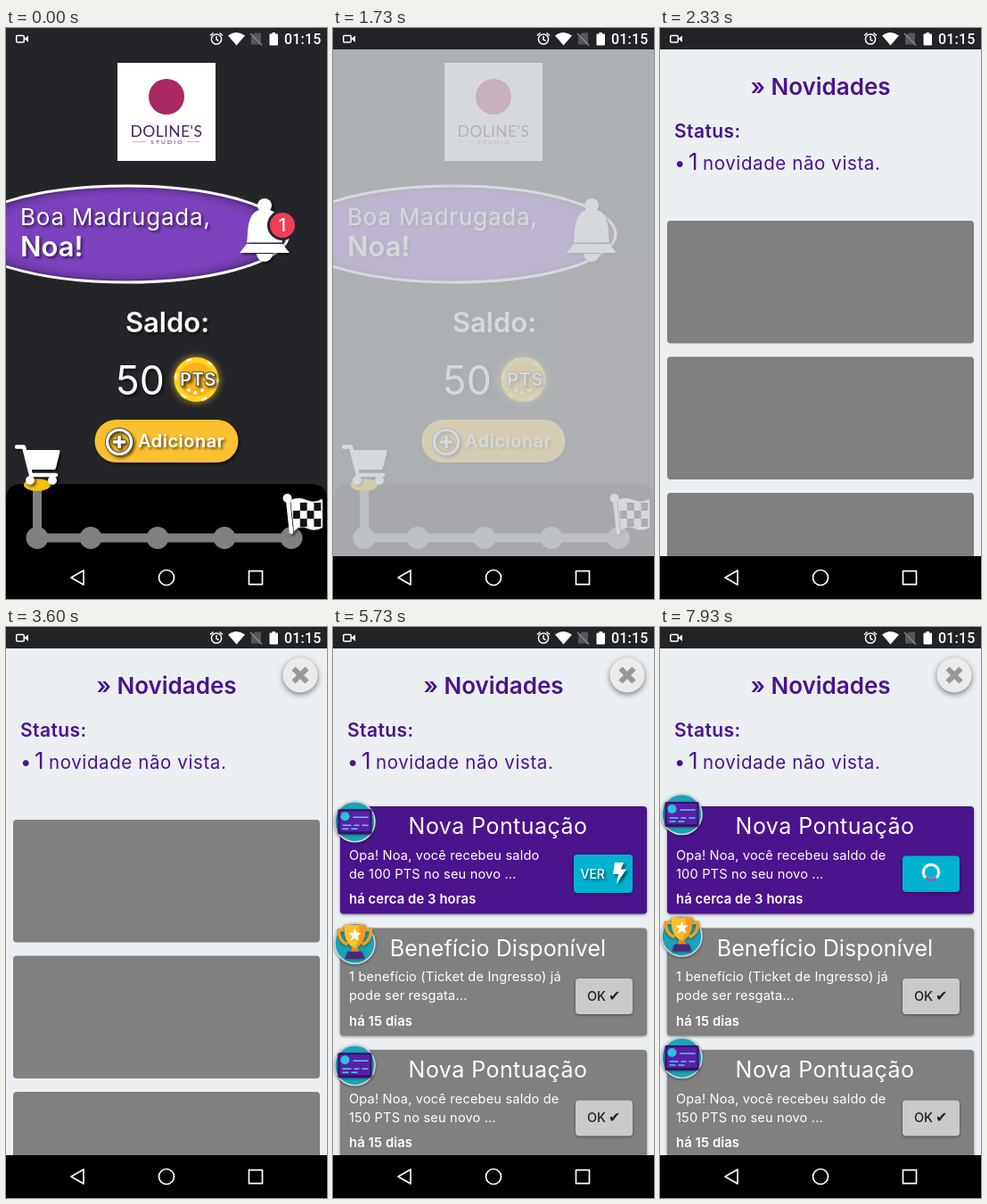
Write an HTML page that moves like this. It is 360 px wide and 640 px high and loops after 8000 ms.

```html
<!DOCTYPE html>
<html lang="pt-BR">
<head>
<meta charset="utf-8">
<title>Novidades</title>
<style>
  html, body { margin: 0; width: 100%; height: 100%; overflow: hidden; background: #000; }
  svg { display: block; width: 100%; height: 100%; font-family: Inter, "Open Sans", sans-serif; }
  text { white-space: pre; }
  .bold { font-weight: 600; }
  .shade { filter: drop-shadow(2px 2px 1.5px rgba(0, 0, 0, .6)); }
  .lift { filter: drop-shadow(0 1.5px 1.5px rgba(0, 0, 0, .45)); }
</style>
</head>
<body>
<svg viewBox="0 0 360 640" fill="#fff">
  <defs>
    <radialGradient id="violet">
      <stop offset=".8" stop-color="#7c41bd"/>
      <stop offset=".92" stop-color="#6c39a5"/>
      <stop offset="1" stop-color="#452370"/>
    </radialGradient>
    <clipPath id="page-area"><path d="M0 24H360V592H0Z"/></clipPath>
    <g id="ticket">
      <rect x="-19" y="-14" width="38" height="28" rx="2" fill="#35106b"/>
      <rect x="-17" y="-12" width="34" height="23" rx="1" fill="#5a1fa8"/>
      <circle cx="-11" cy="-6" r="5" fill="#26c6da"/>
      <path d="M-2 -5H15M-14 4H-4M-1 4H5M8 4H15M-14 8H-7M-4 8H3" stroke="#4dd0e1" stroke-width="1.6"/>
    </g>
    <g id="trophy">
      <path d="M-12 -15H-18Q-18 -2 -8 1M12 -15H18Q18 -2 8 1" fill="none" stroke="#f0a020" stroke-width="3.5"/>
      <path d="M-3 2H3L5 11H-5Z" fill="#e08a1e"/>
      <path d="M-12 -21H12Q13 1 0 5Q-13 1 -12 -21Z" fill="#fbc02d"/>
      <path d="M4 -21H12Q13 1 0 5Q6 -4 4 -21Z" fill="#f39c1f"/>
      <path d="M0 -17L2 -12 7 -12 3 -8 5 -3 0 -6 -5 -3 -3 -8 -7 -12 -2 -12Z"/>
      <path d="M-8 9H8L11 17H-11Z" fill="#4b2a7c"/>
    </g>
  </defs>

  <rect width="360" height="640" fill="#232529"/>

  <g id="home">
    <rect x="125" y="39" width="110" height="110"/>
    <circle cx="180" cy="77" r="20" fill="#a8285f"/>
    <g fill="#4a2560" text-anchor="middle" font-family="Lato, sans-serif">
      <text x="180" y="122" font-size="17.5" letter-spacing=".4">DOLINE'S</text>
      <text x="181" y="130" font-size="6.5" letter-spacing="2.2">STUDIO</text>
      <path d="M142 127.5H157M203 127.5H218" stroke="#b79fc0" stroke-width=".8"/>
    </g>

    <ellipse cx="135" cy="231" rx="182" ry="54" fill="url(#violet)" stroke="#fff" stroke-width="3"/>
    <g class="shade">
      <text x="16" y="221" font-size="26" letter-spacing=".8">Boa Madrugada,</text>
      <text x="16" y="256" font-size="31" class="bold">Noa!</text>
    </g>

    <g id="bell" class="shade">
      <circle cx="290" cy="199" r="8"/>
      <path d="M270 240.500C272 231 268 203 290 203S308 231 310 240.500Z"/>
      <path d="M270 242H310L318 252H262Z"/>
      <path d="M281 253a9 9 0 0 0 18 0Z"/>
    </g>
    <g id="badge">
      <circle cx="310" cy="221" r="15.500" fill="#ef3f53" stroke="#2a2238" stroke-width="3"/>
      <text x="310" y="228" font-size="20" font-weight="500" text-anchor="middle">1</text>
    </g>

    <g class="shade">
      <text x="181" y="341" font-size="31" class="bold" text-anchor="middle">Saldo:</text>
      <text x="150.500" y="411" font-size="44.500" text-anchor="middle">50</text>
    </g>
    <g style="filter:drop-shadow(0 0 4px #c9a02e)">
      <circle cx="213.500" cy="394" r="25" fill="#ffd426"/>
      <circle cx="213.500" cy="394" r="23.500" fill="none" stroke="#fff0b0" stroke-width="3" stroke-dasharray="6 18.600"/>
      <circle cx="213.500" cy="394" r="19" fill="#fbb31a"/>
      <path d="M205 406h.1M212 409h.1M220 406h.1" stroke="#fff" stroke-width="4" stroke-linecap="round"/>
    </g>
    <text x="215.500" y="401" font-size="20" class="bold shade" letter-spacing=".7" text-anchor="middle"
      stroke="#51412b" stroke-width="1.600" paint-order="stroke">PTS</text>

    <rect x="99.500" y="439" width="161" height="48" rx="24" fill="#fac02f" class="shade"/>
    <g class="shade">
      <circle cx="127" cy="464" r="13.500" fill="none" stroke="#54472a" stroke-width="5"/>
      <circle cx="127" cy="464" r="13.500" fill="none" stroke="#fff" stroke-width="3.200"/>
      <path d="M119.500 464h15M127 456.500v15" stroke="#54472a" stroke-width="5.500"/>
      <path d="M120 464h14M127 457v14" stroke="#fff" stroke-width="3.600"/>
      <text x="148" y="470" font-size="20" class="bold" letter-spacing=".5">Adicionar</text>
    </g>

    <path d="M0 640V529Q0 511 18 511H342Q360 511 360 529V640Z" fill="#000"/>
    <g id="track" fill="#808080">
      <path d="M35 514V571.500H320" fill="none" stroke="#808080" stroke-width="10"/>
    </g>
    <ellipse cx="35" cy="512" rx="15" ry="7" fill="#f4c20d"/>
    <g class="shade">
      <path d="M12 469.500H20L28 501H56" fill="none" stroke="#fff" stroke-width="4.500" stroke-linecap="round" stroke-linejoin="round"/>
      <path d="M22 473H59Q61 473 60.500 475L56 493Q55.500 495 54 495H27Z"/>
      <circle cx="27" cy="507" r="5"/><circle cx="52" cy="507" r="5"/>
    </g>
    <g id="flag" class="shade">
      <path d="M316 528L320 565" stroke="#fff" stroke-width="4.500" stroke-linecap="round"/>
      <circle cx="315.500" cy="527" r="5"/>
      <path d="M319 529Q328 525 337 529T354 528Q355 528 355 530V560Q346 565 338 561T323 564Z"/>
    </g>
  </g>

  <rect id="dim" width="360" height="640" fill="#000"/>
  <g id="page" clip-path="url(#page-area)">
    <rect y="24" width="360" height="568" fill="#ebeff2"/>
    <g id="news" fill="#4a148c">
      <text x="180" y="75" font-size="26" class="bold" text-anchor="middle">» Novidades</text>
      <text x="16" y="123" font-size="21" class="bold" letter-spacing=".4">Status:</text>
      <text x="16" y="159" font-size="22">•</text>
      <text x="32" y="159" font-size="26">1</text>
      <text x="48" y="159" font-size="20.500" letter-spacing=".6">novidade não vista.</text>
    </g>
    <g id="placeholders" fill="#808080">
      <rect x="8" y="216" width="344" height="137.500" rx="4"/>
      <rect x="8" y="368.500" width="344" height="137.500" rx="4"/>
      <rect x="8" y="521" width="344" height="137.500" rx="4"/>
    </g>
    <g id="cards"></g>
    <g id="icons"></g>
    <g id="close">
      <circle cx="330" cy="54" r="19.500" fill="#ebebec" style="filter:drop-shadow(0 2px 3px rgba(0,0,0,.5))"/>
      <path d="M322.500 46.500l15 15M337.500 46.500l-15 15" stroke="#989898" stroke-width="6"/>
    </g>
  </g>

  <rect id="status-shade" width="360" height="24" fill="#212327"/>
  <g id="status">
    <rect x="11.700" y="8.500" width="8.500" height="7.500" rx="1" fill="none" stroke="#fff" stroke-width="1.500"/>
    <path d="M20.500 12L25 8.500V16Z"/>
    <g fill="none" stroke="#fff" stroke-width="1.500">
      <circle cx="236" cy="12.500" r="5.600"/>
      <path d="M236 9V13L238.500 14.500M229 8.500L232.500 5.500M243 8.500L239.500 5.500"/>
    </g>
    <path d="M249 8.500Q258.500 1.500 268 8.500L258.500 19.500Z"/>
    <path d="M279 5.500H286V18.500H275V9.500Z" fill="#55565b"/>
    <path d="M274 6L287 19.500" stroke="#85868a" stroke-width="1.500"/>
    <path d="M298.500 5H302V6.500H304Q305 6.500 305 7.500V18.500Q305 19.500 304 19.500H296.500Q295.500 19.500 295.500 18.500V7.500Q295.500 6.500 296.500 6.500H298.500Z"/>
    <text x="312" y="18" font-size="16" font-weight="500" letter-spacing=".2" font-family="Roboto, sans-serif">01:15</text>
  </g>
  <rect id="nav-shade" y="592" width="360" height="48" fill="#000"/>
  <g fill="none" stroke="#fff" stroke-width="1.700" stroke-linejoin="round">
    <path d="M73 616L87 608V624Z"/>
    <circle cx="180" cy="616" r="8.500"/>
    <rect x="272.500" y="608.700" width="15" height="15"/>
  </g>
</svg>

<script>
const LOOP = 8000;
const FADE = 1665, LISTED = 2330, CLOSE_IN = 2830, LOADED = 4400, ICONS_IN = 5480, TAPPED = 7070;

const byId = id => document.getElementById(id);
const show = (id, visible) => byId(id).setAttribute("display", visible ? "inline" : "none");
const set = (id, name, value) => byId(id).setAttribute(name, value);
const progress = (t, start, length) => Math.min(1, Math.max(0, (t - start) / length));

const okButton = y => `
  <rect x="272" y="${y + 56.5}" width="64" height="40" rx="4" fill="#c8cacb" class="lift"/>
  <g fill="#222"><text x="285" y="${y + 81}" font-size="14.5" font-weight="500">OK</text>
  <text x="309" y="${y + 81}" font-size="16" font-family="DejaVu Sans, sans-serif">✔</text></g>`;

const seeButton = `
  <g id="see">
    <rect x="270" y="255" width="66" height="43" rx="4" fill="#00b2cf" class="lift"/>
    <g class="shade"><text x="277.5" y="282" font-size="14" font-weight="500">VER</text>
    <path d="M316 264H326L323 271.5H329L318 288L320 277H314Z"/></g>
  </g>
  <g id="loading">
    <rect x="272" y="256.5" width="64" height="40.500" rx="4" fill="#00b2cf" class="lift"/>
    <g id="spinner" fill="none" stroke-width="3.200">
      <circle cx="304" cy="275" r="8.700" stroke="#f3f3f3"/>
      <path d="M297.800 281.200A8.700 8.700 0 0 0 310.200 281.200" stroke="#7a68b0"/>
    </g>
  </g>`;

const body = (y, lines, id = "") => `<g id="${id}" font-size="14.6" letter-spacing=".17">` +
  lines.map((line, i) => `<text x="18" y="${y + 59.5 + 21 * i}">${line}</text>`).join("") + "</g>";

const card = (y, color, title, spacing, content, age, button) => `
  <rect x="8" y="${y}" width="344" height="120.500" rx="4" fill="${color}" class="lift"/>
  <text x="185" y="${y + 31}" font-size="25" letter-spacing="${spacing}" text-anchor="middle">${title}</text>
  ${content}<text x="18" y="${y + 109}" font-size="14.8" letter-spacing=".1" class="bold">${age}</text>${button}`;

const greeting = "Opa! Noa, você recebeu saldo";
byId("cards").innerHTML =
  card(201, "#4a148c", "Nova Pontuação", .45,
    body(201, [greeting, "de 100 PTS no seu novo ..."], "narrow") +
    body(201, [greeting + " de", "100 PTS no seu novo ..."], "wide"),
    "há cerca de 3 horas", seeButton) +
  card(337.5, "#808080", "Benefício Disponível", .1,
    body(337.5, ["1 benefício (Ticket de Ingresso) já", "pode ser resgata..."]),
    "há 15 dias", okButton(337.5)) +
  card(474, "#808080", "Nova Pontuação", .45,
    body(474, [greeting + " de", "150 PTS no seu novo ..."]),
    "há 15 dias", okButton(474));

byId("icons").innerHTML = [[210, "ticket"], [346.5, "trophy"], [483, "ticket"]].map(([y, shape]) => `
  <g transform="translate(24.5 ${y})">
    <circle r="22.500" fill="#1ba3b8" stroke="#cdd8da" stroke-width="1.600" class="lift"/>
    <use href="#${shape}" class="lift"/>
  </g>`).join("");

byId("track").innerHTML += [35, 95, 170, 245, 320]
  .map(x => `<circle cx="${x}" cy="571.500" r="12.500"/>`).join("");

for (let row = 0; row < 3; row++)
  for (let col = 0; col < 4; col++)
    if ((row + col) % 2)
      byId("flag").innerHTML += `<rect x="${322 + col * 7.8}" y="${532 + row * 9}" width="7.800" height="9" fill="#111"/>`;

function draw(t) {
  const ring = progress(t, 730, 600);
  const angle = 20 * Math.sin(4 * Math.PI * ring) * (1 - ring);
  set("bell", "transform", `rotate(${angle} 290 200)`);
  show("badge", t < FADE);

  // The home screen darkens while the news page fades in over it.
  const fade = t < FADE ? 0 : progress(t, FADE - 75, 200);
  set("dim", "opacity", fade / 2);
  set("page", "opacity", fade);
  show("status-shade", fade > 0);
  show("nav-shade", fade > 0);

  show("news", t >= LISTED);
  show("placeholders", t >= LISTED && t < LOADED);
  show("cards", t >= LOADED);

  const pop = 1 - (1 - progress(t, CLOSE_IN, 770)) ** 2;
  set("close", "opacity", pop);
  set("close", "transform", `translate(330 54) scale(${.3 + .7 * pop}) translate(-330 -54)`);

  const rise = progress(t, ICONS_IN, 590);
  set("icons", "transform", `translate(0 ${33 * (1 - rise) ** 2.5})`);
  set("icons", "opacity", progress(t, ICONS_IN, 200));

  const tapped = t >= TAPPED;
  show("see", !tapped);
  show("narrow", !tapped);
  show("loading", tapped);
  show("wide", tapped);
  set("spinner", "transform", `rotate(${(t - 7930) * .36} 304 275)`);
}

const start = performance.now();
function tick() {
  draw((performance.now() - start) % LOOP);
  requestAnimationFrame(tick);
}
draw(0);
requestAnimationFrame(tick);
</script>
</body>
</html>
```
